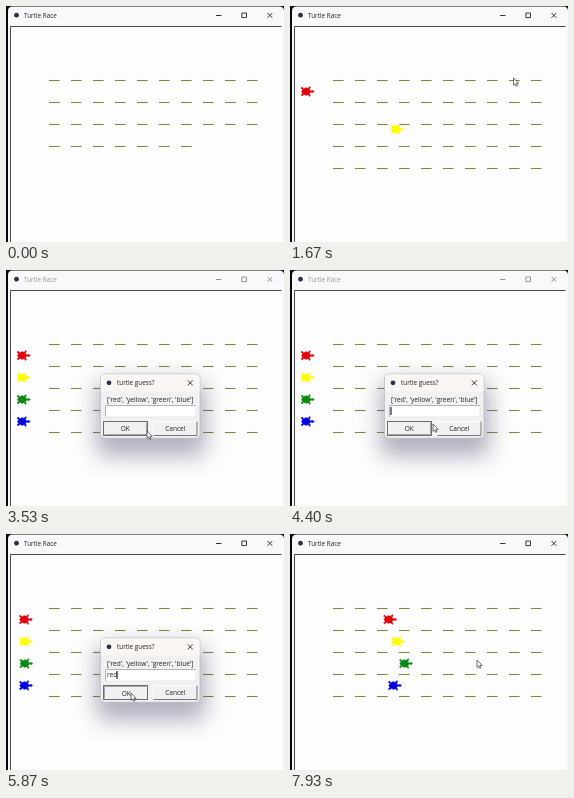
These frames come from a looping animation (278x236 px, 8000 ms). An HTML page:

```html
<!DOCTYPE html>
<html lang="en">
<head>
<meta charset="utf-8">
<title>Turtle Race</title>
<style>
  html, body { margin: 0; width: 100%; height: 100%; overflow: hidden; background: #08080c; }
  svg { display: block; width: 100vw; height: 100vh; }
  text { font: 6.5px "Open Sans", "Noto Sans", sans-serif; fill: #222; }
  .title { font-size: 6.35px; }
  .glyph { fill: none; stroke: #222; stroke-width: .9; }
  .inactive text { fill: #999; }
  .inactive .glyph { stroke: #8a8a8a; }
</style>
</head>
<body>
<svg viewBox="0 0 278 236" preserveAspectRatio="none">
  <defs>
    <filter id="blur" x="-50%" y="-60%" width="200%" height="220%"><feGaussianBlur stdDeviation="11"/></filter>
    <path id="turtle" transform="scale(.55)" d="M16 0L14-2 10-1 7-4 9-7 8-9 5-6 1-7-3-5-6-8-8-6-5-4-7 0-5 4-8 6-6 8-3 5 1 7 5 6 8 9 9 7 7 4 10 1 14 2Z"/>
  </defs>

  <path d="M2 236V5Q2 .5 6.5 .5H273.5Q278 .5 278 5V236Z" fill="#f9f8fa"/>
  <rect x="4" y="20" width="272" height="216" fill="#fdfdfd"/>
  <path d="M4.5 236V20.5H275.5" fill="none" stroke="#484848"/>
  <g id="titlebar">
    <circle cx="10.5" cy="9.2" r="2.4" fill="#2c3048"/>
    <text class="title" x="18" y="11.5">Turtle Race</text>
    <path class="glyph" d="M210 9.5H215.5M235.9 7H240.5V11.6H235.9ZM261.5 7L266.3 11.8M266.3 7L261.5 11.8"/>
  </g>

  <g id="dashes" stroke="#84843f" stroke-width="1.1"></g>
  <g id="turtles"></g>

  <g id="dialog">
    <rect x="91" y="112" width="108" height="74" rx="8" fill="#5c5a78" opacity=".48" filter="url(#blur)"/>
    <rect x="94.5" y="103.9" width="99.5" height="64.3" rx="4" fill="#f1f1f3" stroke="#b9b9c0" stroke-width=".7"/>
    <path d="M95 121.5V108Q95 104.3 98.5 104.3H190Q193.6 104.3 193.6 108V121.5Z" fill="#f9f6f4"/>
    <circle cx="103" cy="112.8" r="2.4" fill="#2c3048"/>
    <text class="title" x="111" y="115.2">turtle guess?</text>
    <path class="glyph" d="M181.8 110.4L186.8 115.4M186.8 110.4L181.8 115.4"/>
    <text x="101" y="132" style="font-size:6.6px">['red', 'yellow', 'green', 'blue']</text>
    <rect x="99.5" y="135.5" width="90.5" height="11.5" fill="#fff"/>
    <path d="M99.5 147V135.5H190" fill="none" stroke="#b4b4b4"/>
    <path d="M99.5 147H190V135.5" fill="none" stroke="#e6e6e6"/>
    <text id="entry" x="101" y="143.3"></text>
    <path id="caret" stroke="#111" stroke-width="1.1"/>
    <rect x="97.5" y="151.5" width="44" height="14" fill="#f1f1f3" stroke="#6c6c6c"/>
    <path id="bevel" d="M98.5 164.5H140.5V152.5" fill="none" stroke="#a4a4a4"/>
    <text id="ok" x="119.3" y="161" text-anchor="middle">OK</text>
    <path d="M147.5 165.5V151.5H191" fill="none" stroke="#fff"/>
    <path d="M147.5 165.5H191V151.5" fill="none" stroke="#777"/>
    <text x="169.3" y="161" text-anchor="middle">Cancel</text>
  </g>

  <path id="cursor" d="M0 0V7.4L1.7 5.9 2.8 8.3 4 7.8 2.9 5.4H5.2Z" fill="#fff" stroke="#333" stroke-width=".7"/>
</svg>
<script>
const LOOP = 8000, STEP = 1000 / 15;
const DIALOG_OPEN = 2860, DIALOG_CLOSE = 5920;
const RACE_FROM = 5810, RACE_TO = 7930;
const HOME = [141, 129.5], START_X = 15.4;
const PLACE_FROM = 1165, PLACE_TIME = 390;

const $ = id => document.getElementById(id);
const clamp = v => Math.max(0, Math.min(1, v));
const mix = (a, b, p) => a + (b - a) * p;
const show = (el, on) => { el.style.display = on ? '' : 'none'; };

function add(parent, tag, attrs) {
  const el = document.createElementNS('http://www.w3.org/2000/svg', tag);
  for (const key in attrs) el.setAttribute(key, attrs[key]);
  return parent.appendChild(el);
}

const dashes = Array.from({ length: 50 }, (_, i) => add($('dashes'), 'path', {
  d: `M${43 + i % 10 * 22} ${74.5 + Math.floor(i / 10) * 22}h10.6`
}));

const racers = [['#e2000c', 98], ['#fdfd00', 106], ['#0a8a10', 113.8], ['#0000e0', 102.7]]
  .map(([color, finalX], i) => ({
    finalX,
    y: 85.5 + i * 22,
    el: add($('turtles'), 'use', { href: '#turtle', fill: color, stroke: color, 'stroke-width': 1 })
  }));

// time, x, y of the pointer tip
const pointer = [
  [0, 290, -12], [330, 282, 2], [800, 253, 33], [1500, 225, 70], [2530, 204, 96],
  [2900, 195, 106], [3500, 141, 161], [3900, 141, 161], [4350, 143, 154],
  [5300, 143, 154], [5730, 125, 159], [5960, 125, 159], [6700, 187, 126], [8000, 187, 126]
];

// time, typed text, caret x
const typing = [[0, '', 101], [4730, 'r', 104], [4930, 're', 107.6], [5130, 'red', 111]];

function pointerAt(t) {
  const i = Math.max(1, pointer.findIndex(k => k[0] > t));
  const [a, b] = [pointer[i - 1], pointer[i]];
  const p = clamp((t - a[0]) / (b[0] - a[0]));
  const eased = p * p * (3 - 2 * p);
  return [mix(a[1], b[1], eased), mix(a[2], b[2], eased)];
}

function render(t) {
  const drawn = 37 + Math.floor(t / 88);
  dashes.forEach((el, i) => show(el, i < drawn));

  const race = clamp((t - RACE_FROM) / (RACE_TO - RACE_FROM));
  racers.forEach((r, i) => {
    const placed = (t - PLACE_FROM) / PLACE_TIME - i;
    const p = clamp(placed);
    const x = race ? mix(START_X, r.finalX, race) : mix(HOME[0], START_X, p);
    show(r.el, placed >= 0);
    r.el.setAttribute('transform', `translate(${x} ${mix(HOME[1], r.y, p)})`);
  });

  show($('dialog'), t >= DIALOG_OPEN && t < DIALOG_CLOSE);
  $('dialog').style.opacity = clamp((t - DIALOG_OPEN + 60) / 160);
  $('titlebar').classList.toggle('inactive', t >= DIALOG_OPEN && t < RACE_FROM);

  const [, typed, caretX] = typing.filter(k => k[0] <= t).pop();
  $('entry').textContent = typed;
  $('caret').setAttribute('d', `M${caretX} 137V145`);
  show($('caret'), t >= 4300 && (t - 4300) % 900 < 690);

  const pressed = t >= 5730;
  $('ok').setAttribute('transform', pressed ? 'translate(1 .7)' : '');
  $('bevel').setAttribute('d', pressed ? 'M98.5 164.5V152.5H140.5' : 'M98.5 164.5H140.5V152.5');

  $('cursor').setAttribute('transform', `translate(${pointerAt(t)})`);
}

const begin = performance.now();
function tick() {
  const t = (performance.now() - begin) % LOOP;
  render(Math.floor(t / STEP + .05) * STEP);
  requestAnimationFrame(tick);
}
render(0);
requestAnimationFrame(tick);
</script>
</body>
</html>
```
